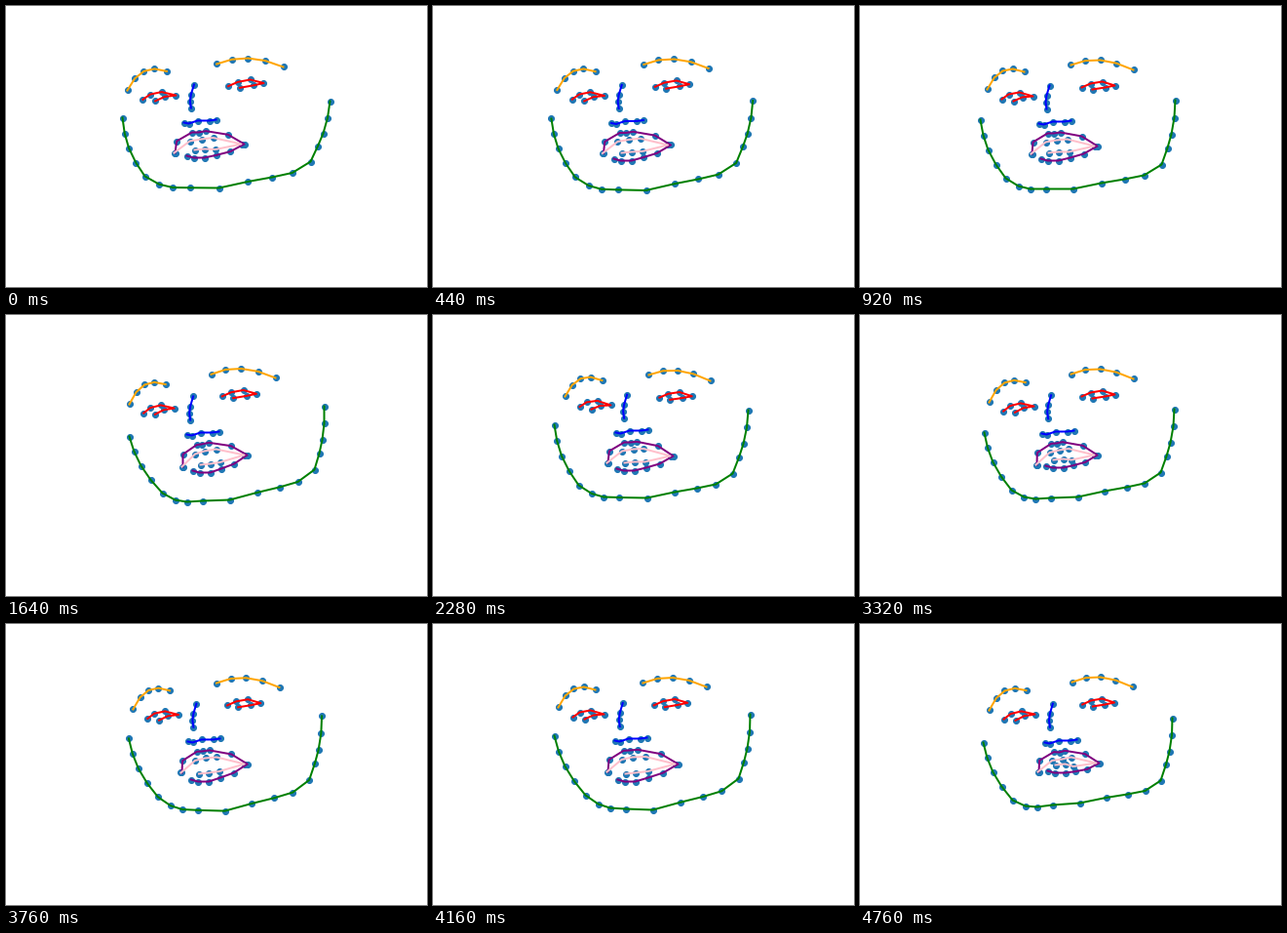
Write a matplotlib script that moves like this. It is 432x288 px and loops after 4.8 s.

```python
import numpy as np
import matplotlib.pyplot as plt
from matplotlib.animation import FuncAnimation

W, H, DPI = 432, 288, 72
FRAMES, STEP = 120, 40
KEY_TIMES = [0, 920, 1640, 2280, 3320, 4160, 4760]
CHIN_DROP = [2, 0, 0, 4.5, 3, 5.5]  # how far the chin dips between two poses


def chain(*coords):
    return np.reshape(coords, (-1, 2)).astype(float)


def arc(*coords):
    """Five points on a parabola through the first, middle and last one."""
    p = chain(*coords)
    return np.column_stack([np.polyval(np.polyfit([0, 2, 4], c, 2), range(5))
                            for c in p.T])


def poses(*rows):
    """Control shifts per pose; the second pose is the rest shape."""
    shifts = np.reshape(rows, (len(rows), -1, 2)).astype(float)
    return np.insert(shifts, 1, 0, axis=0)


jaw = chain(123, 116, 126, 132, 131, 147, 139, 162, 149, 176, 162, 184,
            174, 187, 190, 187, 218, 187, 247, 181, 271, 177, 291, 173,
            309, 162, 315, 145, 319, 131, 322, 114, 323, 96)
left_brow = arc(130, 85, 146, 66, 168, 67)
right_brow = arc(216, 60, 246, 55, 280, 65)
bridge = chain(194, 81, 191, 91, 190, 98, 191, 105)
nostrils = chain(183, 120, 188, 121, 197, 118, 209, 118, 216, 117)
left_eye = chain(145, 95, 152, 90, 163, 88, 177, 92, 166, 93, 157, 97)
right_eye = chain(227, 83, 236, 79, 248, 77, 261, 81, 251, 83, 238, 85)
outer_lip = chain(176, 151, 177, 139, 192, 130, 198, 130, 205, 129, 227, 133,
                  243, 143, 229, 151, 215, 155, 203, 158, 192, 158, 185, 156)
inner_lip = chain(175, 151, 190, 139, 201, 137, 212, 136,
                  240, 143, 214, 149, 203, 149, 193, 150)

# Left ear, left cheek, chin, right cheek, right ear.
JAW = poses([-4, -2, -7, -2, 0, -1, 3, -3, 9, 1],
            [3, 8, 11, 6, 11, 2, 7, -4, 3, -3],
            [1, -4, 0, -2, 1, 0, -2, 0, 0, 1],
            [4, 4, 6, 3, 5, -1, -1, -1, -1, 0],
            [1, -2, 7, -1, 7, 3, 4, -4, 2, -4],
            [3, 5, 7, 4, 7, -4, -1, -2, -3, 0])
# Outer and inner end of the left eye, inner and outer end of the right one.
EYES = poses([-6, 1, -3, -1, 0, -1, 4, -3],
             [-4, 6, -5, 3, -6, 0, -4, -1],
             [5, -2, 5, 0, 5, 1, 4, 2],
             [2, 4, 1, 1, 0, 0, 0, 0],
             [-2, 0, -2, 0, -1, 0, 0, -1],
             [2, 3, 2, 0, 1, -1, -1, -1])
# Left corner, upper lip, right corner, lower lip.
MOUTH = poses([-3, -1, -1, -1, 1, -2, 0, -3],
              [5, 4, 2, 2, 4, 0, 6, 3],
              [3, 0, 4, 0, 3, 1, 3, 1],
              [5, 2, 3, 1, 0, 0, 5, -2],
              [3, 0, 3, -1, 8, 0, 4, 3],
              [7, 0, 6, 1, 2, -1, 7, -6])


def spread(at, knots, shifts):
    return np.column_stack([np.interp(at, knots, s) for s in shifts.T])


def along(pts, knots, shifts):
    return pts + spread(np.arange(len(pts)), knots, shifts)


def face(t):
    """All chains with their colors at time t."""
    k = min(np.searchsorted(KEY_TIMES, t, "right"), len(KEY_TIMES) - 1)
    t0, t1 = KEY_TIMES[k - 1], KEY_TIMES[k]
    u = (t - t0) / (t1 - t0)
    chin, eyes, mouth = [(1 - u) * p[k - 1] + u * p[k]
                         for p in (JAW, EYES, MOUTH)]
    drop = np.array([0, CHIN_DROP[k - 1] * np.sin(np.pi * u)])
    chin[2] += drop
    mouth[3] += 0.8 * drop
    upper_lip = mouth[1]

    def warp(pts):
        return pts + spread(pts[:, 0], [130, 178, 220, 275], eyes)

    return [("green", along(jaw, [0, 4, 8, 12, 16], chin)),
            ("orange", warp(left_brow)),
            ("orange", warp(right_brow)),
            ("blue", 0.6 * warp(bridge) + 0.4 * (bridge + upper_lip)),
            ("blue", nostrils + upper_lip),
            ("red", warp(left_eye)),
            ("red", warp(right_eye)),
            ("purple", along(outer_lip, [0, 3, 6, 9], mouth)),
            ("pink", along(inner_lip, [0, 2, 4, 6], mouth))]


fig = plt.figure(figsize=(W / DPI, H / DPI), dpi=DPI, facecolor="white")
ax = fig.add_axes([0, 0, 1, 1])
ax.set(xlim=(0, W), ylim=(H, 0))
ax.axis("off")

dots = ax.scatter([], [], s=36, color="tab:blue", zorder=1)
lines = [ax.plot([], [], color=color, lw=2, zorder=2)[0]
         for color, _ in face(0)]


def update(frame):
    shapes = [pts + 0.5 for _, pts in face(frame * STEP)]
    dots.set_offsets(np.vstack(shapes))
    for line, pts in zip(lines, shapes):
        line.set_data(*pts.T)
    return [dots, *lines]


anim = FuncAnimation(fig, update, frames=FRAMES, interval=STEP,
                     repeat=True, repeat_delay=0)
plt.show()
```
